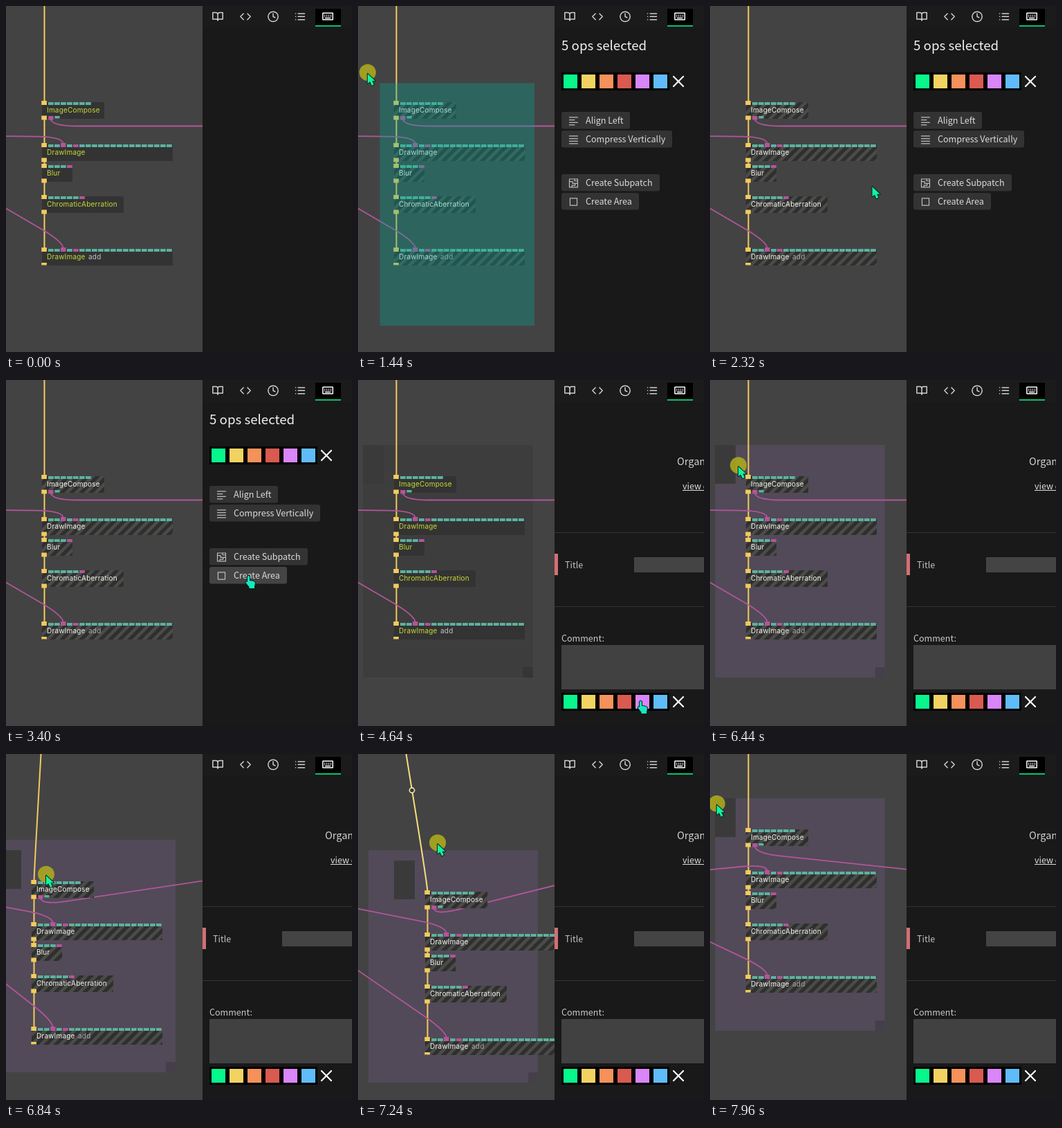
An HTML page with a canvas for the animation above (8 s loop, 500 px wide and 500 px high).

```html
<!DOCTYPE html>
<html lang="en">
<head>
<meta charset="utf-8">
<title>Patch editor</title>
<style>
html, body { margin: 0; width: 100%; height: 100%; overflow: hidden; background: #191919; }
canvas { display: block; width: 500px; height: 500px; }
</style>
</head>
<body>
<canvas id="stage" width="500" height="500"></canvas>
<script>
const ctx = document.getElementById('stage').getContext('2d');
const LOOP = 8000, SPLIT = 284;
const UI = '"Noto Sans CJK JP", "Noto Sans CJK SC", "Noto Sans CJK", "Noto Sans", sans-serif';
const OP_FONT = '10px Inter, sans-serif';
const YELLOW = '#f2cb5e', TEAL = '#5cb29f', PINK = '#b2559c';
const SWATCHES = ['#07f78c', '#f2d362', '#f5915a', '#d95a50', '#d886fa', '#5fbcf9'];

// pinks: indexes of texture inputs; outs: extra output colours
const ops = [
  { title: 'ImageCompose', y: 139, w: 90, ports: 7, pinks: [], outs: [PINK, TEAL] },
  { title: 'DrawImage', y: 200, w: 189, ports: 20, pinks: [2, 4], outs: [] },
  { title: 'Blur', y: 230, w: 44, ports: 4, pinks: [3], outs: [] },
  { title: 'ChromaticAberration', y: 275, w: 118, ports: 6, pinks: [5], outs: [] },
  { title: 'DrawImage', note: 'add', y: 351, w: 189, ports: 20, pinks: [2, 4], outs: [] }
];

// time, x, y
const cursorKeys = [
  [400, 383, 490], [600, 256, 463], [920, 256, 463], [1020, 225, 420], [1200, 115, 225],
  [1380, 32, 112], [1440, 14, 98], [1720, 2, 80], [1820, 2, 80], [2080, 110, 165],
  [2320, 234, 261], [2560, 350, 283], [4040, 350, 283], [4640, 408, 464], [4960, 408, 464],
  [5640, 40, 114], [5720, 40, 114], [5900, 78, 92], [6060, 72, 62], [6240, 36, 72],
  [6440, 41, 125], [6640, 45, 155], [6900, 64, 178], [7100, 98, 162], [7240, 115, 130.5],
  [7400, 110, 88], [7560, 88, 55], [7760, 45, 47], [7960, 10, 73.5], [8000, 8, 78]
];
const dragKeys = [
  [5740, 0, 0], [5920, 26, -10], [6080, 31, -42], [6240, -5, -38], [6360, -3, -6],
  [6440, 0, 0], [6560, -4, 14], [6720, -8, 32], [6960, -12, 46], [7160, 8, 47],
  [7240, 44, 60], [7340, 58, 40], [7440, 58, 10], [7560, 46, -26], [7720, 22, -48],
  [7880, 0, -34], [7960, 0, -30], [8000, 0, -29]
];

// Smooth curve through timed points, flat where a neighbouring stretch is at rest
function follow(keys, t) {
  const last = keys.length - 1;
  if (t <= keys[0][0]) return [keys[0][1], keys[0][2]];
  if (t >= keys[last][0]) return [keys[last][1], keys[last][2]];
  let i = 0;
  while (keys[i + 1][0] < t) i++;
  const still = (a, b) => a[1] === b[1] && a[2] === b[2];
  const slope = (k, c) => {
    if (k < 1 || k >= last) return 0;
    const a = keys[k - 1], b = keys[k], d = keys[k + 1];
    return still(a, b) || still(b, d) ? 0 : (d[c] - a[c]) / (d[0] - a[0]);
  };
  const a = keys[i], b = keys[i + 1], h = b[0] - a[0], u = (t - a[0]) / h;
  const u2 = u * u, u3 = u2 * u;
  return [1, 2].map(c =>
    (2 * u3 - 3 * u2 + 1) * a[c] + (u3 - 2 * u2 + u) * h * slope(i, c) +
    (3 * u2 - 2 * u3) * b[c] + (u3 - u2) * h * slope(i + 1, c));
}

const snap = (v, step) => Math.round(v / step) * step;
const within = (t, a, b) => t >= a && t < b;

function box(x, y, w, h, color) {
  ctx.fillStyle = color;
  ctx.fillRect(x, y, w, h);
}

function label(text, x, y, color, font) {
  ctx.font = font;
  ctx.fillStyle = color;
  ctx.fillText(text, x, y);
}

function line(points, color, width) {
  ctx.strokeStyle = color;
  ctx.lineWidth = width;
  ctx.beginPath();
  points.forEach(([x, y]) => ctx.lineTo(x, y));
  ctx.stroke();
}

function dot(x, y, r, color) {
  ctx.fillStyle = color;
  ctx.beginPath();
  ctx.arc(x, y, r, 0, Math.PI * 2);
  ctx.fill();
}

function shape(path, x, y, scale, stroke, width, fill) {
  ctx.save();
  ctx.translate(x, y);
  ctx.scale(scale, scale);
  ctx.lineJoin = ctx.lineCap = 'round';
  const p = new Path2D(path);
  ctx.strokeStyle = stroke;
  ctx.lineWidth = width / scale;
  ctx.stroke(p);
  if (fill) { ctx.fillStyle = fill; ctx.fill(p); }
  ctx.restore();
}

// Link leaving a port vertically, then heading straight to a far point
function pinkLink(x, y, bend, farX, farY) {
  const cy = y + bend, dx = farX - x, dy = farY - cy, k = 38 / Math.hypot(dx, dy);
  ctx.strokeStyle = PINK;
  ctx.lineWidth = 1.8;
  ctx.beginPath();
  ctx.moveTo(x, y);
  ctx.quadraticCurveTo(x, cy, x + dx * k, cy + dy * k);
  ctx.lineTo(farX, farY);
  ctx.stroke();
}

function drawLinks(dx, dy) {
  const top = 55.5, x = top + dx, y = 140 + dy, hot = dx >= 30;
  ctx.strokeStyle = hot ? '#f6dd7c' : YELLOW;
  ctx.lineWidth = 2;
  ctx.beginPath();
  ctx.moveTo(top, -96);
  ctx.bezierCurveTo(top, -76, x, y - 20, x, y);
  ctx.stroke();
  line([[x, y], [x, 352 + dy]], YELLOW, 2);
  pinkLink(64.5 + dx, 162 + dy, 11.5, 350, 173.5);
  pinkLink(83 + dx, 200 + dy, -11, -190, 186);
  pinkLink(83 + dx, 351 + dy, -10, -194, 179);
  if (hot) {
    const mx = (top + x) / 2, my = (y - 96) / 2 + 0.5;
    dot(mx, my, 4.4, '#f6e3a0');
    dot(mx, my, 2.8, '#3a3a3a');
  }
}

function stripes(x, y, w, h, t) {
  const pitch = 14, shift = t / 1000 * pitch % pitch;
  ctx.save();
  ctx.beginPath();
  ctx.rect(x, y, w, h);
  ctx.clip();
  for (let s = x - 3 * pitch + shift; s < x + w + h; s += pitch) {
    line([[s, y + h + 2], [s + h + 4, y - 2]], '#4b4b48', 4.6);
  }
  ctx.restore();
}

function drawOp(op, dx, dy, selected, t) {
  const x = 52 + dx, y = op.y + dy;
  box(x, y, op.w, 24, selected ? '#2f2f2f' : '#333');
  if (selected) stripes(x, y, op.w, 24, t);
  for (let i = 0; i < op.ports; i++) {
    const pink = op.pinks.includes(i), linked = pink && i === 2;
    box(x + 9 + i * 9, y - (linked ? 2 : 0), linked ? 7.5 : 7.8, linked ? 6 : 4, pink ? PINK : TEAL);
  }
  box(x - 0.7, y - 2, 7.6, 6, YELLOW);
  if (op.note) box(x - 0.7, y + 20, 7.6, 3.5, YELLOW);
  else box(x - 0.7, y + 19.5, 7.6, 6, YELLOW);
  op.outs.forEach((c, i) => box(x + 9.3 + i * 9, y + 20, 7.3, i ? 3.5 : 5.5, c));
  ctx.letterSpacing = '0.2px';
  label(op.title, x + 7, y + 14.5, selected ? '#f4f4f0' : '#c9d936', OP_FONT);
  if (op.note) label(op.note, x + 67, y + 14.5, selected ? '#aaa' : '#c4c4c4', OP_FONT);
  ctx.letterSpacing = '0px';
}

function drawArea(x, y, purple) {
  box(x, y, 245, 336, purple ? '#524a58' : '#3d3d3d');
  box(x + 231, y + 321, 14, 15, purple ? '#463f4a' : '#353535');
}

const TABS = [
  'M2 4h6a4 4 0 0 1 4 4v12a3 3 0 0 0-3-3H2zM22 4h-6a4 4 0 0 0-4 4v12a3 3 0 0 1 3-3h7z',
  'M16 18l6-6-6-6M8 6l-6 6 6 6',
  'M22 12a10 10 0 1 1-20 0a10 10 0 1 1 20 0M12 6v6l4 2',
  'M8 6h13M8 12h13M8 18h13M3 6h.1M3 12h.1M3 18h.1',
  'M2 5h20v13H2zM6 9h.1M10 9h.1M14 9h.1M18 9h.1M6 12h.1M10 12h.1M14 12h.1M18 12h.1M7 15h10'
];

function drawTabs() {
  box(SPLIT, 0, 216, 31, '#1b1b1b');
  box(447, 4, 37, 25, '#000');
  box(447, 28, 37, 1.5, '#07f78c');
  [306, 346, 386, 425, 465].forEach((x, i) =>
    shape(TABS[i], x - 8.6, 15.3 - 8.6, 0.72, i === 4 ? '#fff' : '#d0d0d0', 1.5));
}

function drawSwatches(y) {
  box(294, y - 3, 156, 26, '#000');
  SWATCHES.forEach((c, i) => box(297 + i * 26, y, 20, 20, c));
  shape('M0 0L14 14M14 0L0 14', 456, y + 3, 1, '#fff', 2.2);
}

const BUTTONS = [
  ['Align Left', 153, 99, 'M0 1h13M0 5h8M0 9h13M0 13h8'],
  ['Compress Vertically', 180, 160, 'M0 1h13M0 5h13M0 9h13M0 13h13'],
  ['Create Subpatch', 243, 142, 'M0 0h13v13H0zM0 4h5v3h8M4 13v-3h5v-3M8 0v3h5'],
  ['Create Area', 270, 112, 'M1 1h11v11H1z']
];

function drawSelectionPanel(count, hover) {
  label(count + ' ops selected', 294, 64, '#f2f2f2', '18.7px ' + UI);
  drawSwatches(99);
  BUTTONS.forEach(([text, y, w, icon], i) => {
    ctx.fillStyle = hover && i === 3 ? '#444' : '#333';
    ctx.beginPath();
    ctx.roundRect(294, y, w, 24.5, 3);
    ctx.fill();
    shape(icon, 305.5, y + 7, 0.92, '#bdbdbd', 1.2);
    label(text, 329, y + 17, '#dcdcdc', '12.55px ' + UI);
  });
}

function drawAreaPanel() {
  label('Organize ops', 461, 123, '#d2d2d2', '14.5px ' + UI);
  label('view docs', 469, 158, '#dedede', '12.55px ' + UI);
  box(469, 159, 31, 1, '#dedede');
  box(SPLIT, 220, 216, 1, '#343434');
  box(SPLIT, 327, 216, 1, '#343434');
  box(SPLIT, 251, 5, 31, '#d36f72');
  label('Title', 299, 272, '#c4c4c4', '12.55px ' + UI);
  box(399, 256, 101, 22, '#444');
  label('Comment:', 294, 378, '#c9c9c9', '12.55px ' + UI);
  box(294, 383, 206, 64, '#414141');
  drawSwatches(455);
}

const ARROW = 'M0 0V14L3.4 11.4L6 17L9 15.6L6.5 10.4H11Z';
const HAND = 'M0 1.5C0-.6 3-.6 3 1.5V7L5.5 7.2L8 7.8L10.4 8.8L11 11L10 15V18H2.5V16L-2 10.5C-3 8.5-1 7.6 0 9Z';

function drawCursor(x, y, hand, pressed) {
  if (pressed) dot(x, y - 2, 12, 'rgba(178,174,28,0.85)');
  if (hand) shape(HAND, x - 1, y, 1, '#06231f', 2, '#16e8bd');
  else shape(ARROW, x, y, 1, '#06251c', 2, '#12f2a0');
}

function render(t) {
  const cursor = follow(cursorKeys, t);
  const selecting = within(t, 920, 1800);
  const corner = follow(cursorKeys, Math.max(920, t - 60));
  const raw = follow(dragKeys, t), late = follow(dragKeys, t - 80);
  const dx = snap(raw[0], 15), dy = snap(raw[1], 15);
  const hasArea = t >= 3520, dragging = t >= 5740;

  const picked = ops.map(op => {
    if (selecting) return corner[0] < 52 + op.w && corner[1] < op.y + 24;
    return within(t, 1800, 3520) || dragging;
  });
  const count = picked.filter(Boolean).length;

  ctx.save();
  ctx.beginPath();
  ctx.rect(0, 0, SPLIT, 500);
  ctx.clip();
  box(0, 0, SPLIT, 500, '#434343');
  if (hasArea) {
    const purple = t >= 4920;
    drawArea(7.5 + snap(late[0], 7.5), 94 + snap(late[1], 15), purple);
    box(7 + dx, 94 + dy, 30, 56, '#3b3a3b');
  }
  drawLinks(dx, dy);
  ops.forEach((op, i) => drawOp(op, dx, dy, picked[i], t));
  if (selecting) {
    box(corner[0], corner[1], 255 - corner[0], 462 - corner[1], 'rgba(0,168,151,0.32)');
  }
  ctx.restore();

  box(SPLIT, 0, 216, 500, '#191919');
  drawTabs();
  if (hasArea) drawAreaPanel();
  else if (count > 0) drawSelectionPanel(count, t >= 2500);

  if (t >= 400) {
    const hand = within(t, 2500, 4120) || within(t, 4600, 5020);
    const pressed = selecting || within(t, 3520, 3640) || within(t, 4920, 5040) || t >= 5720;
    drawCursor(cursor[0], cursor[1], hand, pressed);
  }
}

const start = performance.now();
function tick() {
  render((performance.now() - start) % LOOP);
  requestAnimationFrame(tick);
}
tick();
</script>
</body>
</html>
```
